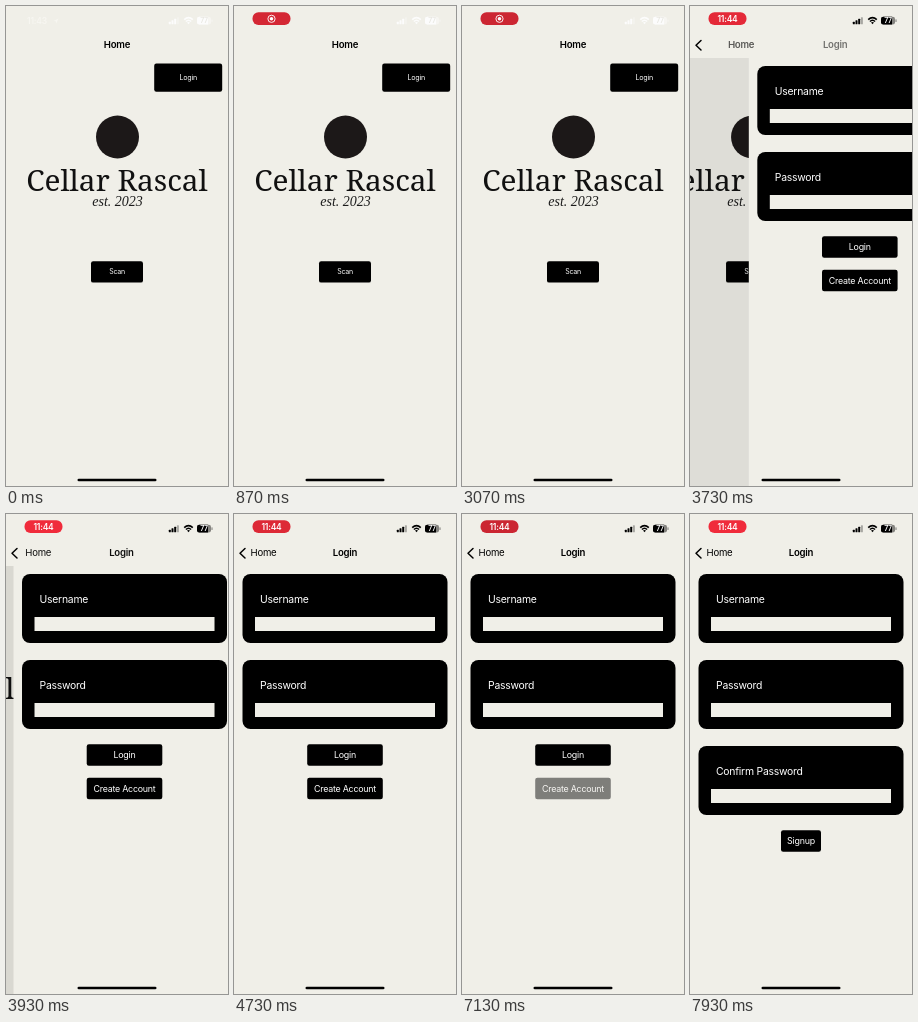
Write an HTML page that moves like this. It is 222 by 480 pixels and loops after 8000 ms.

```html
<!DOCTYPE html>
<html lang="en">
<head>
<meta charset="utf-8">
<title>Pantry app</title>
<style>
  html, body { margin: 0; width: 100%; height: 100%; overflow: hidden; background: #f0efe8; }
  svg { display: block; width: 100vw; height: 100vh; font-family: Inter, Roboto, sans-serif; letter-spacing: -.015em; }
  .mid { text-anchor: middle; }
  .bold { font-weight: 600; }
  .serif { font-family: "Noto Serif", serif; letter-spacing: 0; }
  .est { font-family: "Liberation Serif", serif; font-style: italic; letter-spacing: 0; }
</style>
</head>
<body>
<svg viewBox="0 0 222 480">
  <rect width="222" height="480" fill="#f0efe8"/>

  <g id="home">
    <rect y="52" width="222" height="428" fill="#f0efe8"/>
    <circle cx="111.5" cy="131" r="21.5" fill="#1c1818"/>
    <text class="mid serif" x="111" y="185" font-size="29.8" fill="#111">Cellar Rascal</text>
    <text class="mid est" x="111.5" y="199.5" font-size="14" fill="#1c1c1c">est. 2023</text>
    <g id="homeButtons"></g>
  </g>
  <rect id="dim" y="52" width="222" height="428" opacity="0"/>

  <g id="login">
    <rect y="52" width="222" height="428" fill="#f0efe8"/>
    <g id="cards"></g>
    <g id="signIn"></g>
    <g id="create"></g>
    <g id="signUp"></g>
  </g>

  <g id="header" font-size="9.6">
    <path id="back" d="M11 34.5L6 39.2L11 44" fill="none" stroke="#000" stroke-width="1.5" stroke-linecap="round" stroke-linejoin="round"/>
    <text id="homeTitle" class="mid bold" y="42.4">Home</text>
    <text id="homeLabel" class="mid" y="42.4">Home</text>
    <text id="loginTitle" class="mid bold" y="42.4">Login</text>
  </g>

  <text id="plainTime" class="mid bold" x="31" y="18" font-size="8.5" fill="#f7f6f1">11:43</text>
  <path id="arrow" d="M47.5 15L52.5 12.5L50.3 17.5L49.8 15.3Z" fill="#f7f6f1"/>
  <g id="pill">
    <rect id="pillBody" x="18.5" y="6.2" width="38" height="12.8" rx="6"/>
    <g id="record">
      <circle cx="37.5" cy="12.8" r="3.6" fill="none" stroke="#fff" stroke-width=".9"/>
      <circle cx="37.5" cy="12.8" r="1.8" fill="#fff"/>
    </g>
    <text id="pillTime" class="mid bold" x="37.5" y="16" font-size="8.5" fill="#fff">11:44</text>
  </g>

  <g id="status">
    <g id="bars"></g>
    <g fill="none" stroke="currentColor" stroke-width="1.6">
      <path d="M178.2 13.6Q182.5 9.6 186.8 13.6M179.9 15.5Q182.5 13 185.1 15.5"/>
    </g>
    <path d="M181 16.6Q182.5 15.4 184 16.6L182.5 18.2Z" fill="currentColor"/>
    <rect x="191" y="10.8" width="14" height="7.8" rx="2.3" fill="currentColor" opacity=".45"/>
    <path d="M193.3 10.8H202V18.6H193.3Q191 18.6 191 16.3V13.1Q191 10.8 193.3 10.8Z" fill="currentColor"/>
    <rect x="205.5" y="13.3" width="1" height="2.8" rx=".5" fill="currentColor" opacity=".5"/>
    <text id="charge" class="mid bold" x="198" y="17.2" font-size="7">77</text>
  </g>

  <rect x="71.5" y="472.7" width="79" height="2.6" rx="1.3"/>
</svg>

<script>
const LOOP = 8000;
const PUSH_START = 3530, PUSH_END = 4200;
const PRESS = 7060, FORM_SWAP = 7330;
const $ = id => document.getElementById(id);
const clamp = v => Math.max(0, Math.min(1, v));
const ramp = (t, from, to) => clamp((t - from) / (to - from));
const mix = (a, b, k) => a + (b - a) * k;
const fade = (id, v) => $(id).setAttribute("opacity", v);
const slide = (id, x) => $(id).setAttribute("transform", `translate(${x} 0)`);

const button = (x, y, w, h, label, size) =>
  `<rect x="${x}" y="${y}" width="${w}" height="${h}" rx="2.2"/>
   <text class="mid" x="${x + w / 2}" y="${y + h / 2 + size * 0.36}" font-size="${size}" fill="#fff">${label}</text>`;

const card = (label, i) =>
  `<g id="card${i}" transform="translate(0 ${60 + i * 86})">
     <rect x="8.5" width="205" height="69" rx="8"/>
     <text x="26" y="28.5" font-size="10.4" fill="#fff">${label}</text>
     <rect x="21" y="43" width="180" height="14" fill="#f0efe8"/>
   </g>`;

$("homeButtons").innerHTML = button(148.2, 57.5, 68, 28.3, "Login", 7.2) + button(85, 255.2, 52, 21.4, "Scan", 7);
$("cards").innerHTML = ["Username", "Password", "Confirm Password"].map(card).join("");
$("signIn").innerHTML = button(73.2, 230.2, 75.6, 21.6, "Login", 8.9);
$("create").innerHTML = button(73.2, 263.7, 75.6, 21.6, "Create Account", 8.9);
$("signUp").innerHTML = button(91, 316.2, 40, 21.6, "Signup", 8.9);
$("bars").innerHTML = [2.5, 4, 5.5, 7].map((h, i) =>
  `<rect x="${162.8 + i * 2.7}" y="${18.2 - h}" width="2" height="${h}" rx=".5" fill="currentColor" opacity="${i < 3 ? 1 : 0.3}"/>`).join("");

// Critically damped spring
function pushProgress(t) {
  if (t <= PUSH_START) return 0;
  if (t >= PUSH_END) return 1;
  const s = (t - PUSH_START) * 0.013;
  return 1 - (1 + s) * Math.exp(-s);
}

function drawStatus(t) {
  const shown = ramp(t, 70, 400);
  const dark = ramp(t, PUSH_START, PUSH_START + 180);
  const glow = 0.5 + 0.5 * Math.cos((t - 180) / 1000 * Math.PI);
  $("pillBody").setAttribute("fill",
    `rgb(${mix(203, 246, glow)},${mix(38, 44, glow)},${mix(50, 60, glow)})`);
  fade("pill", shown);
  fade("plainTime", 1 - shown);
  fade("arrow", 1 - shown);
  fade("record", 1 - dark);
  fade("pillTime", dark);
  const ink = mix(252, 0, dark);
  $("status").style.color = `rgb(${ink},${ink},${ink})`;
  $("charge").setAttribute("fill", dark < 0.5 ? "#e9e8e2" : "#fff");
}

function drawPush(p) {
  slide("home", -66.6 * p);
  slide("login", 222 * (1 - p));
  fade("dim", p * 0.1);
  fade("back", clamp(p * 1.4));
  const homeX = mix(111, 29.5, p), swap = ramp(p, 0.6, 1);
  $("homeTitle").setAttribute("x", homeX);
  $("homeLabel").setAttribute("x", homeX);
  fade("homeTitle", mix(1, 0.7, ramp(p, 0, 0.6)) * (1 - swap));
  fade("homeLabel", swap);
  $("loginTitle").setAttribute("x", mix(240, 111, p));
  fade("loginTitle", ramp(p, 0.45, 1));
}

function drawForm(t) {
  const signingUp = t >= FORM_SWAP;
  fade("card2", +signingUp);
  fade("signUp", +signingUp);
  fade("signIn", +!signingUp);
  fade("create", signingUp ? 0 : mix(1, 0.47, ramp(t, PRESS, PRESS + 65)));
}

function frame() {
  const t = performance.now() % LOOP;
  drawStatus(t);
  drawPush(pushProgress(t));
  drawForm(t);
  requestAnimationFrame(frame);
}
frame();
</script>
</body>
</html>
```
